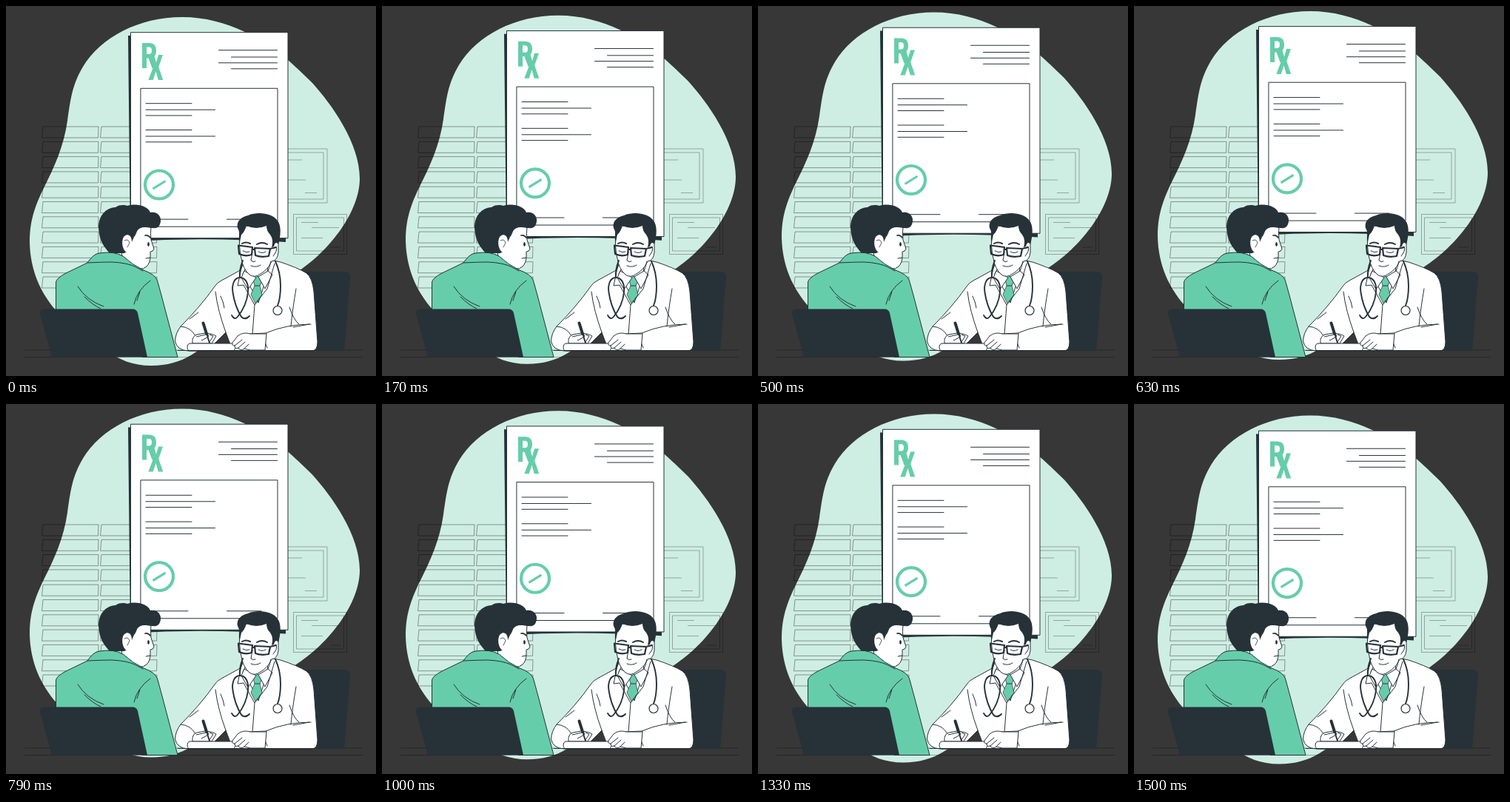
An HTML page that plays this animation: 500 by 500 pixels, repeating every 1540 ms.

```html
<!DOCTYPE html>
<html lang="en">
<head>
<meta charset="utf-8">
<title>Prescription</title>
<style>
html, body { margin: 0; width: 100%; height: 100%; overflow: hidden; background: #373737; }
svg { display: block; width: 100%; height: 100%; }
.ink { fill: #263238; }
.white { fill: #fff; }
.mint { fill: #66cdaa; }
.line { fill: none; stroke: #263238; stroke-linecap: round; stroke-linejoin: round; }
.edge { stroke: #263238; stroke-linejoin: round; }
.wall { fill: none; stroke: #000; }
</style>
</head>
<body>
<svg viewBox="0 0 500 500">
  <g class="float">
    <path fill="#cfeee3" d="M238 15C180 15 128 42 104 82C89 107 87 128 83 155C78 190 66 216 50 248C36 277 32 296 32 320C33 358 47 388 68 412C92 438 112 448 135 465C152 478 172 486 196 486C240 486 262 466 300 432C330 404 360 382 400 355C436 330 478 279 478 233C478 185 440 133 414 104C400 90 390 81 381 73C350 47 300 15 238 15Z"/>
  </g>

  <path id="files" class="wall" opacity=".38"/>
  <path class="wall" opacity=".3" d="M370 193H434V266H370M370 198H429V261H370M380 208H400M380 235H405M404 252.500H420M388.500 281.500H460.500V335.500H388.500ZM392.500 286H456.500V331H392.500ZM399 292.500H422M413 299.500H450M399 313.500H428M438 326H452"/>

  <g class="float">
    <path class="ink" d="M165 40H380L378 319Q270 312 168 318Z"/>
    <path class="white edge" d="M168.500 35.700H381V313.700H168.500Z"/>
    <path class="mint" fill-rule="evenodd" d="M184 50H193.500C199.500 50 203 53.500 203 60C203 65 201.500 68 198 69.500L204 84H197.500L192.500 70.500H190V84H184ZM190 55.500V65H193C196 65 197 63.500 197 60.300S196 55.500 193 55.500Z"/>
    <path class="mint" d="M194 66H200L203 76.500L206 66H212L206.200 82.500L212.300 100H205.800L202.500 88.500L198.700 100H192.300L199 82.500Z"/>
    <path class="line" d="M287.500 59.700H366.500M304.500 69H366.500M287.500 76.800H366.500M304.500 84.800H366.500"/>
    <path class="line" d="M182.300 111.300H367V298.200H182.300Z"/>
    <path class="line" d="M189 131.700H251M189 140.200H282.500M189 148H251M189 167.500H251M189 176H282.500M189 183.800H251M197 288.200H246M298.500 288.200H345"/>
    <circle cx="207" cy="241.500" r="19" fill="none" stroke="#66cdaa" stroke-width="4.200"/>
    <path d="M198.500 247L215.500 236.500" stroke="#66cdaa" stroke-width="3.200"/>
  </g>

  <path class="wall" opacity=".3" d="M25 465H482M25 474.500H482"/>

  <!-- patient -->
  <g>
    <path class="white edge" d="M160 300L196 298Q195 308 196 316L200 328Q199 332 195 332L195 338Q195 347 190 352Q186 356 180 355L183 363L158 350L156 330Z"/>
    <path class="line" d="M164 347Q171 352 181 355M189 341L195 340"/>
    <path class="line" stroke-width="1.800" d="M188 310Q192 309 195 313"/>
    <ellipse class="ink" cx="192.500" cy="322" rx="1.400" ry="3"/>
    <path class="ink" d="M125 300C125 284 134 273 148 272C154 268 160 269 164 270C178 266 192 271 195 279C204 277 210 284 209 291C208 299 203 301 199 300C193 300 187 297 182 300C176 302 177 308 173 312L170 319L163 332L160 334L140 334C133 326 126 318 125 300Z"/>
    <path class="white" d="M170 319C170 310 165 307 160 311C155 316 157 331 164 333L171 334Z"/>
    <path class="line" stroke-width=".8" d="M160 317Q165 314 167 320L164 326"/>
    <path class="mint edge" d="M67.500 420V373Q68 368 81 361L110 347Q118 335 126 334Q146 331 158 338Q171 350 186 357Q202 363 204.500 371L210 391L232 474.500H185Z"/>
    <path class="line" d="M110 347Q129 346 143 346Q163 347 174 352L185 358M97 379Q109 398 132 406M106 393Q117 404 128 409M195 371Q177 384 173 403M181 386L177 398"/>
    <path class="ink" d="M51 409.500H171Q176.500 409.500 178 415L191 474.500H62L46 416Q45 409.500 51 409.500Z"/>
  </g>

  <!-- doctor -->
  <g>
    <path class="ink" d="M396 359H459Q466 360 465 368L457 465.500H405Z"/>
    <path class="white edge" fill-rule="evenodd" d="M320 346Q320 356 313 359L291 371Q285 374 282 379Q263 406 236 433Q229 442 228.500 453Q231 465 246 466H414Q421 465 421 454L416 386Q414 367 406 361Q395 354 371 346L357 343ZM297 441L281 457H303Z"/>
    <path class="line" d="M283 386Q286 411 297 441M281 447Q274 453 263 456M236 433Q250 434 256 446M248 423L260 414M290 392Q294 400 295 408M392 382Q387 411 385 433M412 430Q379 430 351 442L330 443M352 442Q347 450 353 462M383 407Q389 425 396 430M388 434L410 430"/>

    <path class="white edge" d="M324 354L320 362L335 388L341 401L354 361L353 347Z"/>
    <path class="mint edge" stroke-width=".7" d="M334 370L340 365L346 371L343 378L346 390L337 402L331 390L336 378Z"/>
    <path class="line" d="M336 378H343"/>
    <path class="white edge" d="M322 358L318 367L327 383L338 367ZM354 358L341 366L350 382L360 363Z"/>
    <path class="line" d="M319 349L313 378L321 377L336 404L353 382L363 348M336 404L333 444"/>

    <path class="white edge" d="M316 298Q314 326 318 341Q320 355 329 363Q336 368 344 362Q354 356 359 345Q367 344 368 333V319L364 294Z"/>
    <path class="line" d="M358 345Q356 354 354 358M362 327Q367 322 365 332L361 338M333 333L331 344Q334 347 337 345M331 351Q338 354 344 350M320 331Q325 334 329 332M341 332Q346 335 351 332"/>
    <path class="line" stroke-width="2" d="M319 321Q324 318 330 321M339 322Q346 318 353 322"/>
    <path class="ink" d="M313 300C311 289 320 285 327 283C342 277 360 281 366 289C373 296 371 312 368 322Q364 317 362 325L359 326Q362 316 357 309Q352 304 352 297Q338 303 325 297Q322 306 318 309L316 319C313 315 318 308 313 300Z"/>
    <path class="line" stroke-width="2.200" d="M314 323.500L333 326L332 336Q323 339 315 335ZM336 327L357 328L355 338Q345 340 337 337ZM333 329H336M357 328L365 326"/>

    <g class="line" stroke-width="1.900">
      <path d="M320 344Q315 356 316 367C308 367 305 377 306.500 387Q309 405 318 420Q323 425 329 419M316 367C325 367 328 377 327 387Q325 405 313 420Q309 425 305 418"/>
      <path d="M364 345Q371 360 371 378Q371 395 367 405"/>
    </g>
    <circle class="white edge" cx="367" cy="411.500" r="6" stroke-width="1.200"/>

    <path class="white edge" d="M252 456Q251 446 258 444L269 442Q280 443 284 446L278 456Z"/>
    <path class="line" stroke-width="4" d="M266.500 428.500L272 446"/>
    <path class="line" stroke-width="2" d="M272 446L275 455"/>
    <path class="white edge" d="M257 447L270 444Q274 446 270 449L264 452M275 444L280 446L275 454"/>
    <path class="white edge" d="M248 456H313L308 466H249Q245 466 245 461Q245 457 248 456Z"/>
    <path class="white edge" d="M330 443Q320 440 313 446L306 455Q305 459 309 459Q309 464 314 462Q317 467 322 463L330 465H350L352 443Z"/>
    <path class="line" d="M309 459L319 451M314 462L323 454M322 463L328 457"/>
    <path class="line" d="M232 465.500H419"/>
  </g>
</svg>
<script>
const LOOP = 1540, FRAMES = 37, RISE = 10, LEAD = 50;
const floats = document.querySelectorAll('.float');

let files = '';
for (let row = 0; row < 11; row++) {
  for (const x of [50, 129]) {
    files += `M${x} ${163 + row * 20.3}h75l-.5 15h-76z`;
  }
}
document.getElementById('files').setAttribute('d', files);

// Linear rise and fall, stepped at the animation's frame rate.
function draw(ms) {
  const step = LOOP / FRAMES;
  const t = Math.floor((ms % LOOP) / step + 0.1) * step;
  const p = ((t + LEAD) / LOOP) % 1;
  const lift = RISE * (1 - Math.abs(1 - 2 * p));
  const y = (0.65 - lift).toFixed(2);
  floats.forEach(g => g.setAttribute('transform', `translate(0 ${y})`));
}

const start = performance.now();
function tick() {
  draw(performance.now() - start);
  requestAnimationFrame(tick);
}
tick();
</script>
</body>
</html>
```
